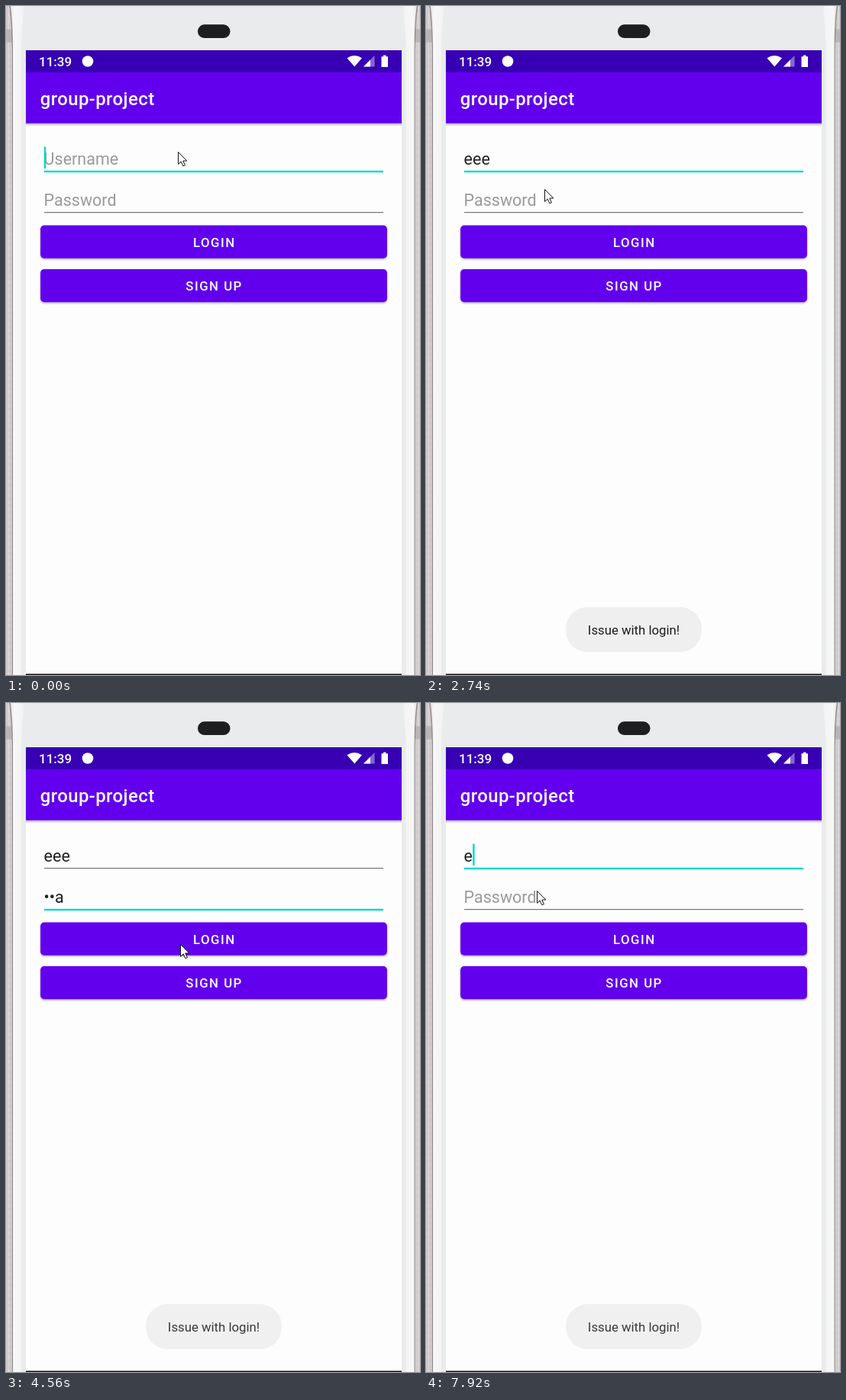
Write an HTML page that moves like this. It is 542x877 px and loops after 8000 ms.

```html
<!DOCTYPE html>
<html lang="en">
<head>
<meta charset="utf-8">
<title>Login screen</title>
<style>
  html, body { margin: 0; width: 100%; height: 100%; overflow: hidden; background: #e9ebec; }
  svg { display: block; width: 100%; height: 100%; }
  text { font-family: Roboto, sans-serif; white-space: pre; }
  .field { font-size: 21.5px; }
  .button { font-size: 16.76px; font-weight: 500; letter-spacing: 1.5px; fill: #fff; text-anchor: middle; }
</style>
</head>
<body>
<svg viewBox="0 0 542 877" preserveAspectRatio="none">
  <defs>
    <linearGradient id="bevel">
      <stop offset="0" stop-color="#e6e5e6"/>
      <stop offset=".25" stop-color="#f7f7f7"/>
      <stop offset=".8" stop-color="#f3f4f4"/>
      <stop offset="1" stop-color="#e9eaec"/>
    </linearGradient>
    <linearGradient id="shade" x2="0" y2="1">
      <stop offset="0" stop-color="#000" stop-opacity=".28"/>
      <stop offset="1" stop-color="#000" stop-opacity="0"/>
    </linearGradient>
    <pattern id="brushed" width="4" height="9" patternUnits="userSpaceOnUse">
      <rect width="4" height="9" fill="#d6d0d2"/>
      <path d="M1.5 0V9" stroke="#c8c2c4"/>
      <path d="M3.5 0V5" stroke="#deD9db"/>
    </pattern>
    <filter id="lift" x="-5%" y="-20%" width="110%" height="150%">
      <feDropShadow dx="0" dy="1.5" stdDeviation="1.1" flood-opacity=".3"/>
    </filter>
    <clipPath id="loginShape"><use href="#plate" y="287.5"/></clipPath>
    <rect id="plate" x="45.1" width="453.8" height="43.2" rx="4.8"/>
    <g id="side">
      <rect width="9" height="877" fill="url(#brushed)"/>
      <path d="M0 31H9M0 47H9" stroke="#aaa5a7"/>
      <rect y="32" width="9" height="14" fill="#b9b5b7"/>
      <path d="M5 0Q8 18 8.5 60V877" fill="none" stroke="#8b8788" stroke-width="1.3"/>
      <path d="M6 0Q9 18 9 60V877H20V60Q20 24 25 0Z" fill="url(#bevel)"/>
    </g>
  </defs>

  <rect width="542" height="877" fill="#e9ebec"/>
  <use href="#side"/>
  <use href="#side" transform="matrix(-1 0 0 1 543.5 0)"/>
  <rect x="251" y="24.3" width="42.5" height="17.7" rx="8.8" fill="#1d1e20"/>

  <rect x="26" y="58" width="492" height="819" fill="#fdfdfd"/>
  <rect x="26" y="153.8" width="492" height="4" fill="url(#shade)"/>
  <rect x="26" y="58" width="492" height="29" fill="#3700b3"/>
  <rect x="26" y="86.8" width="492" height="67" fill="#6200ee"/>
  <rect x="26" y="875.5" width="492" height="1.5" fill="#111"/>

  <g fill="#fff">
    <text x="43" y="79" font-size="17" font-weight="500">11:39</text>
    <circle cx="107" cy="72.5" r="7.3"/>
    <path d="M446.5 68.3Q456.3 61.5 466 68.3L456.3 79.5Z"/>
    <path d="M482.5 65V79.5H468Z" opacity=".4"/>
    <path d="M477 70.5V79.5H468Z"/>
    <path d="M494 64.5h3.5v1.7h2.5v13.8h-8.5v-13.8h2.5z"/>
    <text x="44.8" y="130" font-size="23.94" font-weight="500" letter-spacing=".42">group-project</text>
  </g>

  <g id="fields"></g>
  <rect id="caret" width="2.4" height="28.5" fill="#03dac5"/>

  <g fill="#6200ee" filter="url(#lift)">
    <use href="#plate" y="287.5"/>
    <use href="#plate" y="345"/>
  </g>
  <g clip-path="url(#loginShape)"><circle id="ripple" fill="#fff"/></g>
  <text class="button" x="272.8" y="315.6">LOGIN</text>
  <text class="button" x="272.6" y="373">SIGN UP</text>

  <g id="toast">
    <rect x="183" y="788" width="178" height="59" rx="28.5" fill="#efefef"/>
    <text x="272" y="824" font-size="16.76" text-anchor="middle" fill="#1c1c1c">Issue with login!</text>
  </g>

  <path id="mouse" d="M.5 .5V16.4L4.2 13L6.9 18.8L9.4 17.7L6.8 12H11.8Z" fill="#fff" stroke="#111" stroke-linejoin="round"/>
</svg>
<script>
const LOOP = 8000;
const REFRESH = 136.5;
const BLINK = 500;
const MASK_DELAY = 1500;
const USER = 0, PASS = 1;
const $ = id => document.getElementById(id);
const clamp = x => Math.min(1, Math.max(0, x));

// Holding a key pattern: `count` presses, `gap` ms apart, each adding or removing one character.
const run = (field, start, gap, step, count) =>
  Array.from({ length: count }, (_, i) => ({ field, at: start + i * gap, step }));

// A step of 0 only moves the focus.
const inputs = [
  ...run(USER, 0, 0, 0, 1),
  ...run(USER, 280, 345, 1, 3),
  ...run(PASS, 2860, 0, 0, 1),
  ...run(PASS, 3170, 280, 1, 3),
  ...run(PASS, 6220, 70, -1, 3),
  ...run(USER, 6640, 0, 0, 1),
  ...run(USER, 6790, 140, -1, 3),
  ...run(USER, 7915, 0, 1, 1),
];

const home = { x: 225, y: 191 };
const moves = [
  { from: 710, to: 1370, x: 282, y: 321 },
  { from: 1920, to: 2600, x: 155, y: 240 },
  { from: 3250, to: 3950, x: 202, y: 310 },
  { from: 3950, to: 4500, x: 228, y: 316 },
  { from: 4830, to: 5390, x: 128, y: 214 },
  { from: 5390, to: 5670, x: 121, y: 247 },
  { from: 6360, to: 6640, x: 111, y: 214 },
  { from: 7080, to: 7360, x: 145, y: 246 },
];
const taps = [{ at: 1450, x: 282, y: 321 }, { at: 4570, x: 228, y: 316 }];
const toast = { start: 1920, fadeIn: 280, period: 3240, full: 2500, dimmed: .87 };

function set(node, attrs) {
  for (const name in attrs) node.setAttribute(name, attrs[name]);
}

function add(tag, attrs) {
  const node = document.createElementNS("http://www.w3.org/2000/svg", tag);
  set(node, attrs);
  return $("fields").appendChild(node);
}

const fields = [
  { hint: "Username", y: 208, show: count => "e".repeat(count) },
  { hint: "Password", y: 262, show: (count, idle) =>
    count && idle < MASK_DELAY ? "•".repeat(count - 1) + "a" : "•".repeat(count) },
].map(field => ({
  ...field,
  label: add("text", { class: "field", x: 49.6, y: field.y }),
  line: add("rect", { x: 50, width: 444 }),
}));

function drawField({ hint, y, show, label, line }, index, t) {
  const past = inputs.filter(input => input.at <= t);
  const last = past.at(-1);
  const focused = last.field === index;
  const count = past.reduce((sum, input) => sum + (input.field === index ? input.step : 0), 0);
  const value = show(count, t - last.at);

  label.textContent = value || hint;
  set(label, { fill: value ? "#202020" : "#9a9a9a" });
  set(line, focused
    ? { y: y + 7.8, height: 2.4, fill: "#03dac5" }
    : { y: y + 8, height: 1.2, fill: "#757575" });
  if (focused) {
    const width = value ? label.getComputedTextLength() : 0;
    const lit = Math.floor((t - last.at) / BLINK) % 2 === 0;
    set($("caret"), { x: 49.8 + width, y: y - 23.5, opacity: lit ? 1 : 0 });
  }
}

function drawRipple(t) {
  const tap = taps.findLast(tap => tap.at <= t) ?? { at: -LOOP, x: 0, y: 0 };
  const age = t - tap.at;
  set($("ripple"), { cx: tap.x, cy: tap.y, r: age * .73, opacity: .05 * clamp((650 - age) / 300) });
}

function toastOpacity(t) {
  const age = t - toast.start;
  if (age < toast.fadeIn) return clamp(age / toast.fadeIn);
  return age % toast.period < toast.full ? 1 : toast.dimmed;
}

function mousePosition(t) {
  return moves.reduce((p, move) => {
    const u = clamp((t - move.from) / (move.to - move.from));
    const eased = u * u * (3 - 2 * u);
    return { x: p.x + (move.x - p.x) * eased, y: p.y + (move.y - p.y) * eased };
  }, home);
}

function draw(clock) {
  const t = Math.floor(clock / REFRESH) * REFRESH;
  fields.forEach((field, index) => drawField(field, index, t));
  drawRipple(t);
  set($("toast"), { opacity: toastOpacity(t) });
  const { x, y } = mousePosition(t);
  set($("mouse"), { transform: `translate(${Math.round(x)} ${Math.round(y)})` });
}

const start = performance.now();
function tick() {
  draw((performance.now() - start) % LOOP);
  requestAnimationFrame(tick);
}
tick();
</script>
</body>
</html>
```
